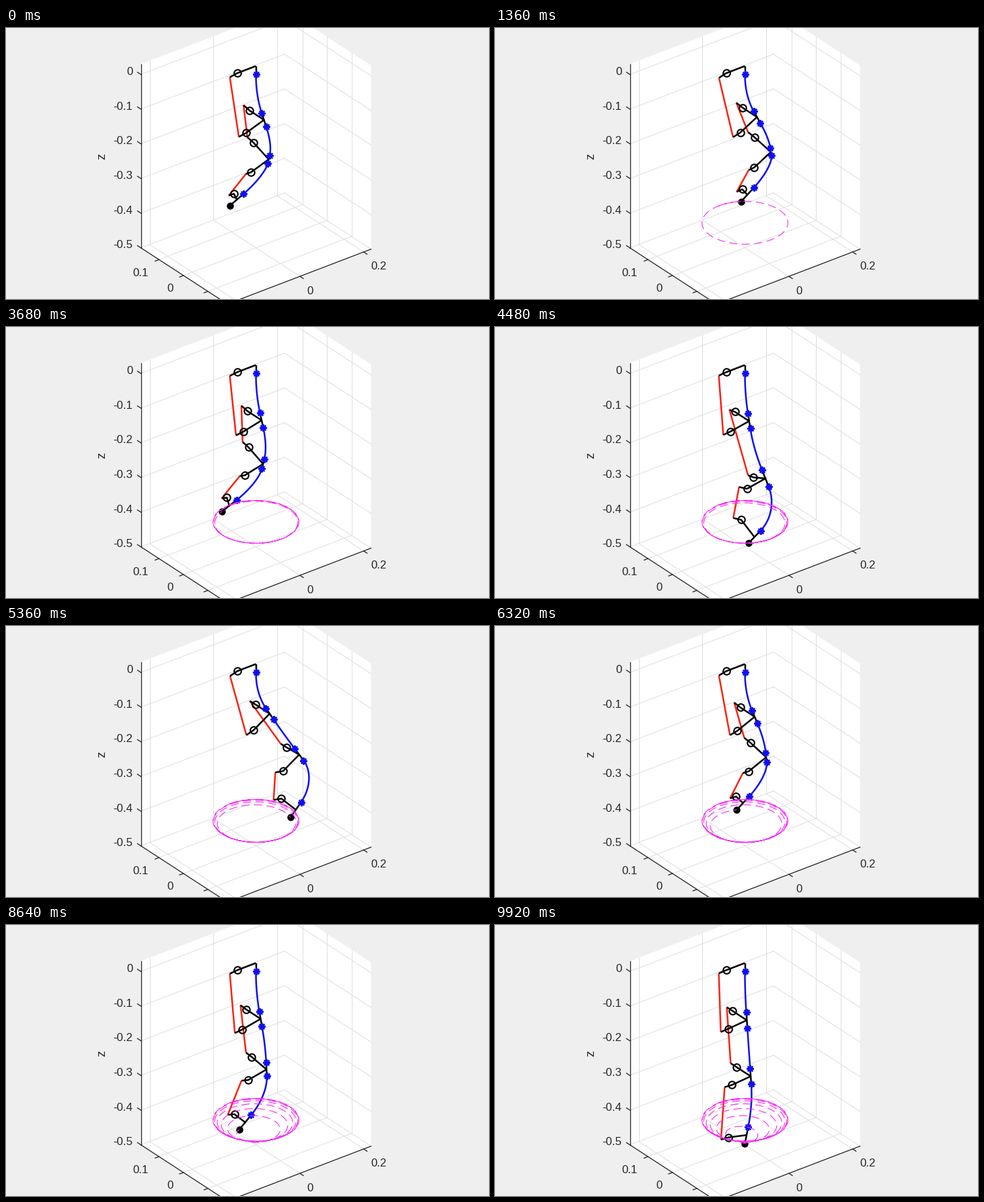
A matplotlib script that plays this animation: 718 px wide and 404 px high, repeating every 10000 ms.

```python
import numpy as np
import matplotlib.pyplot as plt
from matplotlib.animation import FuncAnimation

W, H, DPI = 718, 404, 100
FRAMES, STEP_MS = 125, 80
PX = 72 / DPI                      # one pixel in points

# Robot dimensions in metres
SEG, LINK, BASE = 0.12, 0.0464, 0.024
PIN, ARM = 0.0585, 0.0235
BEND_AXES = (0, 1, 0)              # segments bend in x, y, x
SIDES = (-1, 1, -1)                # side on which each actuator sits

# Axes limits in metres
X0, X1, Y0, Y1, Z0, Z1 = -0.2275, 0.2232, -0.18, 0.174, -0.5, 0.03

AZ, SCALE = np.radians(37.5), 597
CA, SA = np.cos(AZ), np.sin(AZ)


def project(p):
    """Orthographic view (azimuth -37.5, elevation 30) to pixels."""
    x, y, z = np.moveaxis(np.asarray(p, float), -1, 0)
    sx = 371.5 + SCALE * (CA * x - SA * y)
    sy = 69.1 - SCALE * (0.5 * (SA * x + CA * y) + np.cos(np.pi / 6) * z)
    return np.stack([sx, sy], -1)


def tip_path(n):
    """Spiral that narrows and sinks along a cone; n is in frames."""
    s = np.clip(np.asarray(n, float) / (FRAMES - 1), 0, 1)
    rho = (1 - s ** 2.8) ** 0.75
    a = np.radians(23.08) * np.asarray(n, float)
    return np.stack([0.107 * rho * np.sin(a), 0.107 * rho * np.cos(a),
                     -0.4965 + 0.0685 * rho], -1)


def bend(o, R, axis, theta, t=1.0):
    """Point and frame at fraction t of a constant-curvature arc."""
    theta = theta + 1e-9
    a = theta * t
    side, down = R[axis], R[2]
    p = o + SEG / theta * ((1 - np.cos(a)) * side + np.sin(a) * down)
    Q = R.copy()
    Q[axis] = side * np.cos(a) - down * np.sin(a)
    Q[2] = down * np.cos(a) + side * np.sin(a)
    return p, Q


def tip_of(q):
    o, R = np.zeros(3), np.diag([1.0, 1.0, -1.0])
    for axis, theta in zip(BEND_AXES, q):
        o, R = bend(o, R, axis, theta)
        o = o + LINK * R[2]
    return o


def solve(q, target, rounds):
    """Damped Newton search for the three bend angles."""
    for _ in range(rounds):
        err = target - tip_of(q)
        J = np.stack([(tip_of(q + d) - tip_of(q - d)) / 2e-5
                      for d in 1e-5 * np.eye(3)], 1)
        dq = np.linalg.solve(J.T @ J + 1e-8 * np.eye(3), J.T @ err)
        q = q + np.clip(dq, -0.25, 0.25)
    return q


def unit(v):
    return v / np.linalg.norm(v)


def build(q):
    """All drawn parts of the robot for one set of bend angles, in pixels."""
    o, R = np.zeros(3), np.diag([1.0, 1.0, -1.0])
    joint = np.array([0, 0, BASE])
    black = [[joint, o]]
    blue, red, pins, stars = [], [], [], []
    for axis, side, theta in zip(BEND_AXES, SIDES, q):
        arc = [bend(o, R, axis, theta, t)[0] for t in np.linspace(0, 1, 17)]
        end, Q = bend(o, R, axis, theta)
        low = end + LINK / 2 * Q[2]
        top_pin = joint + PIN * side * R[axis]
        low_pin = low + PIN * side * Q[axis]
        rod = unit(low_pin - top_pin)
        out = side * R[axis]
        off = ARM * unit(out - (out @ rod) * rod)
        nxt = end + LINK * Q[2]
        black += [[joint, top_pin, top_pin + off],
                  [low, low_pin, low_pin + off], [end, nxt]]
        red.append([top_pin + off, low_pin + off])
        blue.append(arc)
        pins += [top_pin, low_pin]
        stars += [o, end]
        o, R, joint = nxt, Q, low
    paths = [[project(p) for p in group] for group in (black, red, blue)]
    return paths, project(pins), project(stars), project(o)


def make_poses():
    q = solve(np.array([0.28, 0.55, -0.9]), tip_path(0), 40)
    poses = [build(q)]
    for n in range(1, FRAMES):
        for k in range(1, 5):
            q = solve(q, tip_path(n - 1 + k / 4), 4)
        poses.append(build(q))
    return poses


fig = plt.figure(figsize=(W / DPI, H / DPI), dpi=DPI, facecolor="#efefef")
ax = fig.add_axes([0, 0, 1, 1])
ax.set_xlim(0, W)
ax.set_ylim(H, 0)
ax.axis("off")


def stroke(pts, color, width, **kw):
    x, y = np.asarray(pts).T if len(pts) else ([], [])
    return ax.plot(x, y, color=color, lw=width * PX, **kw)[0]


def edge(a, b, color, width=1.0, **kw):
    stroke(project([a, b]), color, width, **kw)


def draw_box():
    hull = [(X0, Y1, Z0), (X0, Y1, Z1), (X1, Y1, Z1),
            (X1, Y0, Z1), (X1, Y0, Z0), (X0, Y0, Z0)]
    ax.fill(*project(hull).T, color="white", lw=0, zorder=0)

    grid, dark = "#dedede", "#262626"
    for x in (-0.2, 0, 0.2):
        edge((x, Y1, Z0), (x, Y1, Z1), grid, zorder=1)
        edge((x, Y1, Z0), (x, Y0, Z0), grid, zorder=1)
    for y in (-0.1, 0, 0.1):
        edge((X1, y, Z0), (X1, y, Z1), grid, zorder=1)
        edge((X1, y, Z0), (X0, y, Z0), grid, zorder=1)
    for z in np.arange(-5, 1) / 10:
        edge((X0, Y1, z), (X1, Y1, z), grid, zorder=1)
        edge((X1, Y1, z), (X1, Y0, z), grid, zorder=1)

    for a, b in (((X0, Y1, Z1), (X0, Y1, Z0)), ((X0, Y1, Z0), (X0, Y0, Z0)),
                 ((X0, Y0, Z0), (X1, Y0, Z0))):
        edge(a, b, dark, 1.3, zorder=2)
    for x in (-0.2, 0, 0.2):
        edge((x, Y0, Z0), (x, Y0 - 0.014, Z0), dark, 1.3, zorder=2)
    for y in (-0.1, 0, 0.1):
        edge((X0, y, Z0), (X0 - 0.012, y, Z0), dark, 1.3, zorder=2)
    for z in np.arange(-5, 1) / 10:
        edge((X0, Y1, z), (X0, Y1 + 0.014, z), dark, 1.3, zorder=2)

    font = dict(family="Liberation Sans", size=16.8 * PX, color=dark,
                va="center_baseline")
    for k in range(6):
        label = f"-0.{k}" if k else "0"
        ax.text(188.7, 64 + 51.7 * k, label, ha="right", **font)
    for x, y, label in ((200, 364, "0.1"), (244, 387, "0"),
                        (452, 391, "0"), (554, 354.5, "0.2")):
        ax.text(x, y, label, ha="center", **font)
    ax.text(143, 191, "z", rotation=90, ha="center", va="center",
            family="Liberation Sans", size=18.5 * PX, color=dark)
    stroke([(0, 403.5), (W, 403.5)], "#c6c6c6", 1, zorder=9)


draw_box()
poses = make_poses()

SUB = 12
trail_xy = project(tip_path(np.arange((FRAMES - 1) * SUB + 1) / SUB))
trail = stroke([], "#f828f4", 1.1, ls=(0, (11, 6)), dash_capstyle="butt",
               zorder=8.5)

STYLES = (("black", 5), ("#f82414", 4), ("#1010f0", 6))
lines = [[stroke([], color, 2.5, zorder=z, solid_capstyle="butt")
          for _ in group]
         for (color, z), group in zip(STYLES, poses[0][0])]
pin_marks = stroke([], "black", 0, marker="o", ms=10.5 * PX, mfc="none",
                   mec="black", mew=2.1 * PX, zorder=7)
star_marks = stroke([], "#1010f0", 0, marker=(8, 2, 0), ms=10.5 * PX,
                    mec="#1010f0", mew=2.2 * PX, zorder=7)
tip_mark = stroke([], "black", 0, marker="o", ms=10.5 * PX, mec="none",
                  zorder=8)


def update(n):
    paths, pins, stars, tip = poses[n]
    for group, shapes in zip(lines, paths):
        for line, pts in zip(group, shapes):
            line.set_data(*pts.T)
    pin_marks.set_data(*pins.T)
    star_marks.set_data(*stars.T)
    tip_mark.set_data([tip[0]], [tip[1]])
    done = trail_xy[:n * SUB + 1] if n else trail_xy[:0]
    trail.set_data(*done.T)
    return [*sum(lines, []), pin_marks, star_marks, tip_mark, trail]


anim = FuncAnimation(fig, update, frames=FRAMES, interval=STEP_MS,
                     init_func=lambda: update(0), repeat=True, repeat_delay=0)
plt.show()
```
